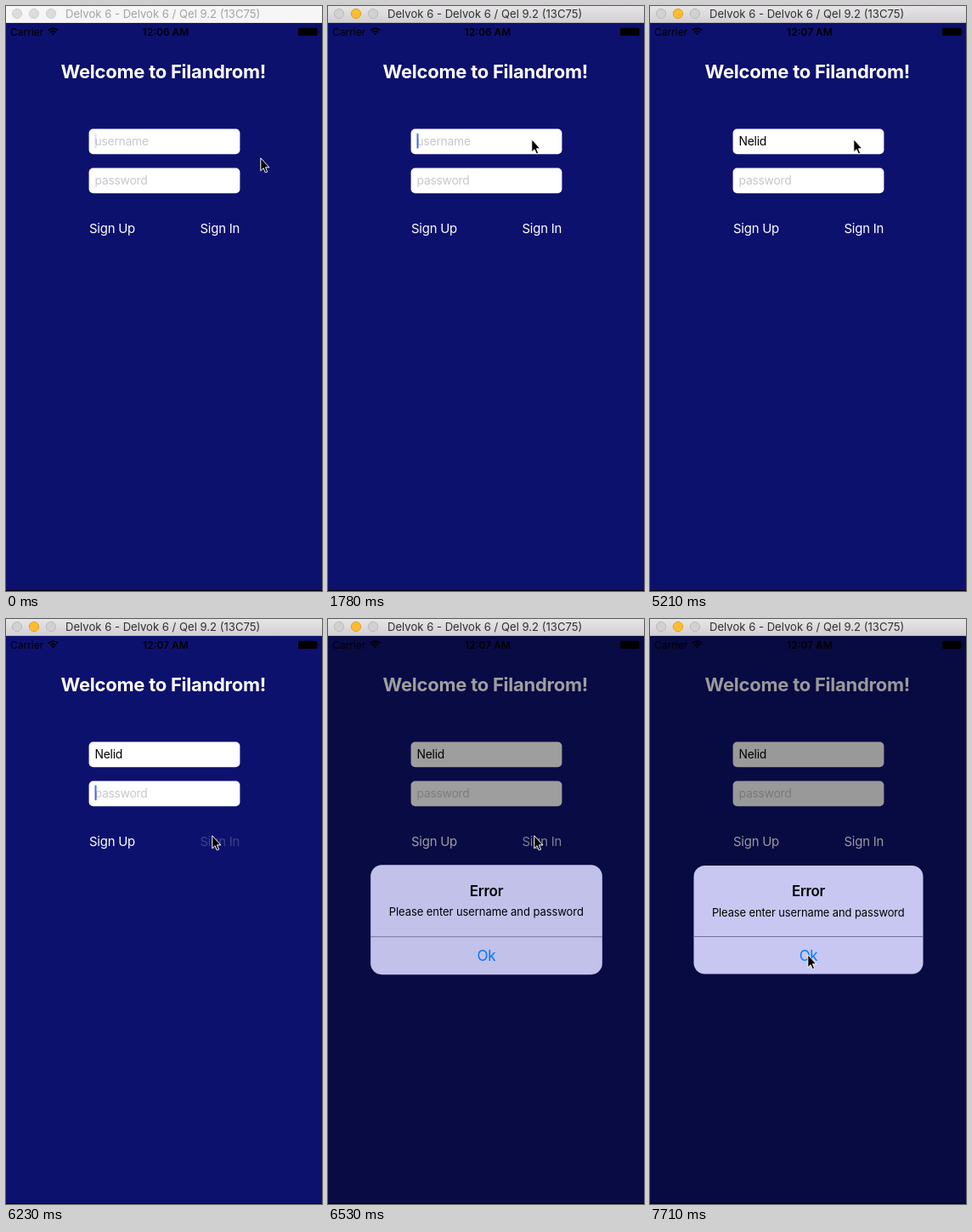
An HTML page for the animation above (8000 ms loop, 372 by 688 pixels).

```html
<!DOCTYPE html>
<html lang="en">
<head>
<meta charset="utf-8">
<title>Sign in</title>
<style>
html, body { margin: 0; width: 100%; height: 100%; overflow: hidden; background: #0d116e; }
svg { display: block; width: 372px; height: 688px; font-family: Inter, "Open Sans", sans-serif; }
text { white-space: pre; }
.bar { font-size: 13.1px; fill: #a3a3a3; }
.active .bar { fill: #303030; }
.strip { fill: #f6f6f6; }
.active .strip { fill: url(#chrome); }
.edge { fill: #e3e3e3; }
.active .edge { fill: #b4b4b4; }
.dot { fill: #dcdcdc; stroke: #d0d0d0; }
.active .dot { fill: #d1d1d1; stroke: #bababa; }
.active .dot.mid { fill: #fdbd2f; stroke: #dfa023; }
.status { font-size: 12px; }
.clock { font-weight: 600; text-anchor: middle; }
.heading { font-size: 22px; font-weight: 700; letter-spacing: -.25px; fill: #fff; }
.field { width: 177.8px; height: 29.7px; rx: 5px; fill: #fff; }
.input { font-size: 13.9px; letter-spacing: -.28px; }
.hint { fill: #c7c7cd; }
.link { font-size: 14.9px; letter-spacing: -.22px; fill: #fff; }
.caret { fill: #426bf2; }
.alert text { text-anchor: middle; }
.alert .title { font-size: 16.9px; font-weight: 600; letter-spacing: -.25px; }
.alert .message { font-size: 12.9px; letter-spacing: -.08px; }
.alert .ok { font-size: 16.9px; letter-spacing: -.3px; fill: #007aff; }
</style>
</head>
<body>
<svg id="stage" viewBox="0 0 372 688">
  <defs>
    <linearGradient id="chrome" x2="0" y2="1">
      <stop stop-color="#e7e5e7"/>
      <stop offset="1" stop-color="#d1cfd1"/>
    </linearGradient>
  </defs>
  <rect width="372" height="688" fill="#0d116e"/>

  <rect class="strip" width="372" height="20"/>
  <rect class="edge" y="19" width="372" height="1"/>
  <circle class="dot" cx="13" cy="9" r="5.6"/>
  <circle class="dot mid" cx="33" cy="9" r="5.6"/>
  <circle class="dot" cx="53" cy="9" r="5.6"/>
  <text class="bar" x="70" y="14">Delvok 6 - Delvok 6 / Qel 9.2 (13C75)</text>

  <text class="status" x="5" y="34.5">Carrier</text>
  <g fill="none" stroke="#000" stroke-width="1.7">
    <path d="M50 28.6Q55.5 23.6 61 28.6M52 31Q55.5 27.8 59 31"/>
    <path d="M53.6 32.2Q55.5 30.6 57.4 32.2L55.5 34.4Z" fill="#000" stroke="none"/>
  </g>
  <text class="status clock" id="clock" x="188" y="34.5"></text>
  <rect x="344" y="25.7" width="22.5" height="9.4" rx="1.6"/>
  <path d="M367.5 28.8Q369.3 30.5 367.5 32.2Z"/>

  <text class="heading" x="64.5" y="85">Welcome to Filandrom!</text>
  <rect class="field" x="97.6" y="144.6"/>
  <rect class="field" x="97.6" y="190.6"/>
  <text class="input hint" id="userHint" x="104.6" y="164">username</text>
  <text class="input" id="user" x="104.6" y="164"></text>
  <text class="input hint" x="104.6" y="210">password</text>
  <rect class="caret" id="caret" width="2" height="17.5"/>
  <text class="link" x="98" y="267">Sign Up</text>
  <text class="link" id="signIn" x="228.5" y="267">Sign In</text>

  <rect id="shade" y="20" width="372" height="668"/>
  <rect y="687" width="372" height="1"/>
  <g class="alert" id="alert">
    <rect id="panel" x="51.5" y="290" width="270" height="127.5" rx="13"/>
    <rect id="rule" x="51.5" y="373" width="270" height="1" fill="#6f6f9c"/>
    <text class="title" x="186.5" y="326">Error</text>
    <text class="message" x="186.3" y="349.5">Please enter username and password</text>
    <text class="ok" x="186.5" y="402">Ok</text>
  </g>
  <path id="cursor" d="M.8 .8V15.8L4.1 12.7L6.3 17.9L8.7 16.9L6.5 11.8H10.9Z" stroke="#fff" stroke-linejoin="round"/>
</svg>
<script>
const LOOP = 8000;
const TICK = 148.25; // the screen refreshes in hard steps
const NAME = "Nelid";

// Moments, counted in ticks
const ACTIVATE = 12, TYPE = 19, TYPED = 21, TAB = 30, MINUTE = 34, PRESS = 42, ALERT = 43;

// Pointer sweeps: curves with one control point
const sweeps = [
  { start: 4, end: 10, from: [299, 178], bend: [292, 240], to: [239, 156] },
  { start: 36, end: 41, from: [239, 156], bend: [242, 205], to: [242, 254] },
  { start: 46, end: 52, from: [242, 254], bend: [222, 315], to: [185, 394] }
];

const $ = id => document.getElementById(id);
const clamp = (v, lo = 0, hi = 1) => Math.min(hi, Math.max(lo, v));
const ease = p => p * p * (3 - 2 * p);

function pointer(k) {
  const { start, end, from, bend, to } = sweeps.findLast(s => k >= s.start) ?? sweeps[0];
  const p = ease(clamp((k - start) / (end - start)));
  const q = 1 - p;
  return from.map((a, i) => q * q * a + 2 * q * p * bend[i] + p * p * to[i]);
}

// Four ticks lit, one fading, two dark
function blink(n) {
  const phase = n % 7;
  return phase < 4 ? 1 : phase === 4 ? .2 : 0;
}

function caretOpacity(k) {
  if (k >= ALERT) return 0;
  if (k >= sweeps[1].end - 4) return 1;
  if (k >= TAB) return blink(k - TAB);
  if (k >= TYPED) return blink(k - TYPED);
  return k >= sweeps[0].end ? 1 : blink(k + 4);
}

function draw(now) {
  const k = Math.floor(now % LOOP / TICK);
  const letters = clamp(2 * (k - TYPE) + 1, 0, NAME.length);
  const settle = Math.exp(-2 * Math.max(0, k - ALERT));
  const alerting = k >= ALERT;

  $("stage").classList.toggle("active", k >= ACTIVATE);
  $("clock").textContent = k < MINUTE ? "12:06 AM" : "12:07 AM";
  $("user").textContent = NAME.slice(0, letters);
  $("userHint").style.opacity = letters ? 0 : 1;

  const inUser = k < TAB;
  const offset = inUser && letters ? $("user").getComputedTextLength() : 0;
  $("caret").setAttribute("x", 104.5 + offset);
  $("caret").setAttribute("y", inUser ? 150 : 195.7);
  $("caret").style.opacity = caretOpacity(k);

  $("signIn").style.opacity = k < PRESS ? 1 : clamp(.2 + .3 * (k - PRESS));
  $("shade").style.opacity = alerting ? .4 - .15 * settle : 0;
  $("alert").style.opacity = alerting ? 1 - .2 * settle : 0;
  $("panel").style.fill = `rgb(199, 199, ${242 - 22 * settle})`;
  $("rule").style.opacity = 1 - .85 * settle;
  $("alert").setAttribute("transform",
    `translate(186.5 353.7) scale(${1 + .074 * settle}) translate(-186.5 -353.7)`);
  $("cursor").setAttribute("transform", `translate(${pointer(k)})`);
}

const origin = performance.now();
function tick() {
  draw(performance.now() - origin);
  requestAnimationFrame(tick);
}
tick();
</script>
</body>
</html>
```
